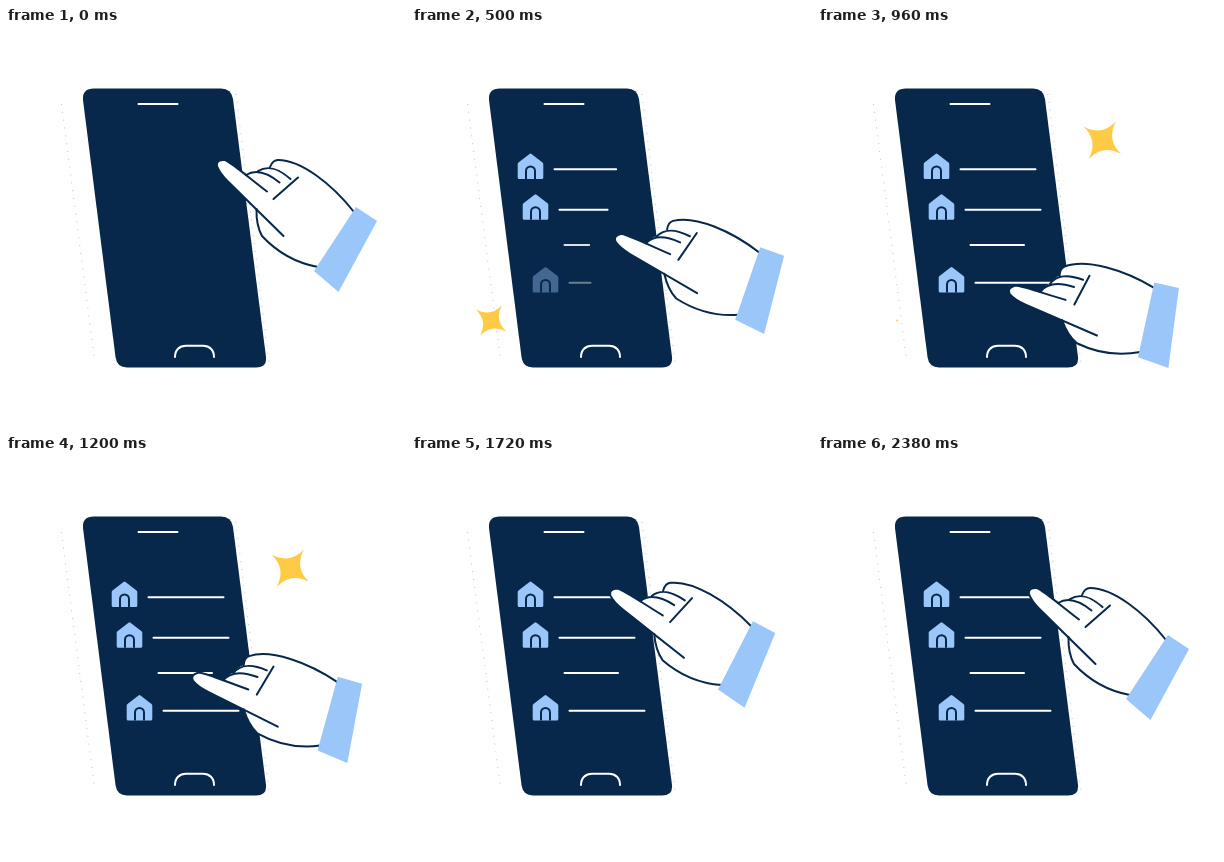
Write an HTML page that moves like this. It is 400 px wide and 400 px high and loops after 2400 ms.

```html
<!DOCTYPE html>
<html lang="en">
<head>
<meta charset="utf-8">
<title>Phone list</title>
<style>
  html, body { margin: 0; width: 100%; height: 100%; overflow: hidden; background: #fff; }
  svg { display: block; width: 100%; height: 100%; }
  .ink { fill: none; stroke: #07284a; stroke-width: 2; stroke-linecap: round; stroke-linejoin: round; }
  .white { fill: none; stroke: #fff; stroke-width: 2; stroke-linecap: round; }
  .edge { fill: none; stroke: #a3c8f6; stroke-width: 1; stroke-dasharray: 1 6.9; }
  .blue { fill: #9ac6f9; }
  .star { fill: #ffcb47; }
</style>
</head>
<body>
<svg viewBox="0 0 400 400">
  <defs>
    <g id="house">
      <path class="blue" d="M-1-12.5Q0-13.3 1-12.5L12-4Q12.8-3.3 12.8-2.3V11Q12.8 12.5 11.3 12.5H-11.3Q-12.8 12.5-12.8 11V-2.3Q-12.8-3.3-12-4Z"/>
      <path class="ink" style="stroke-linecap:butt" d="M-4.5 12.6V4.5A4.5 4.5 0 0 1 4.5 4.5V12.6"/>
    </g>
    <path id="sparkle" class="star" d="M0-1Q.12-.12 1 0Q.12 .12 0 1Q-.12 .12-1 0Q-.12-.12 0-1Z"/>
  </defs>
  <path class="edge" d="M55.5 76L88.5 332M230 66L263 335"/>
  <path fill="#07284a" d="M88 60.5H215Q225.5 60.5 227 71L260 329Q261 339.5 250 339.5H121Q111 339.5 109.5 329L77 72Q76 60.5 88 60.5Z"/>
  <path class="white" d="M132.5 76H171.5M169 329C169 322 173.500 317.800 180 317.800H197C203.500 317.800 208 322 208 329"/>
  <g id="rows"></g>
  <g id="stars"></g>
  <g id="hand">
    <path fill="#fff" d="M240 147Q248 142 253 143Q258 138.5 264 139C266 134 268 132 272 132C295 132 326 156 348 184L312 239.5C290 235 270 223 256 208Q250 197 250.5 181Z"/>
    <path class="ink" style="fill:#fff" d="M277.5 208L222 153.5Q213.5 145 211 138Q210 131.500 219 132C226 135 242 149 261 163.5"/>
    <path class="ink" d="M240 147C248 142 258 142 273.5 154.5M252 143C262 137 272 140 284.5 151M264 139C266 134 268 132 272 132C295 132 326 156 348 184M292 149.5L267.5 171M250.5 181Q250 197 256 208C270 223 290 235 312 239"/>
    <path class="blue" d="M350 179L371 193L332.5 264L308 243Z"/>
  </g>
</svg>
<script>
const LOOP = 2400;
const $ = id => document.getElementById(id);

function add(parent, tag, attrs = {}) {
  const el = document.createElementNS('http://www.w3.org/2000/svg', tag);
  for (const k in attrs) el.setAttribute(k, attrs[k]);
  return parent.appendChild(el);
}

const clamp = v => Math.max(0, Math.min(1, v));
const ease = u => (1 - Math.cos(Math.PI * clamp(u))) / 2;

// Start value, then turning points [from, to, value], eased between
function swing(t, value, ...turns) {
  return turns.reduce((v, [from, to, next]) => v + (next - v) * ease((t - from) / (to - from)), value);
}

const rows = [
  { y: 141.3, len: 75, house: 138.5 },
  { y: 181.8, len: 75, house: 179.2 },
  { y: 217, len: 53.5 },
  { y: 254.7, len: 75, house: 252 }
];
rows.forEach((row, i) => {
  row.x = 142.5 + 5 * i;
  row.start = 110 * i;
  row.el = add($('rows'), 'g');
  if (row.house) add(row.el, 'use', { href: '#house', x: row.x - 24, y: row.house });
  row.line = add(row.el, 'path', { class: 'white' });
});

const stars = [
  { x: 79, y: 292.5, r: 18.7, delay: 0 },
  { x: 284.3, y: 112.2, r: 23.2, delay: 580 }
];
for (const star of stars) star.el = add($('stars'), 'use', { href: '#sparkle' });

function draw(t) {
  for (const { el, line, x, y, len, start } of rows) {
    el.setAttribute('opacity', clamp((t - start - 75) / 240));
    line.setAttribute('d', `M${x} ${y}h${len * clamp((t - start) / 610)}`);
  }

  for (const { el, x, y, r, delay } of stars) {
    const size = swing(t - delay, 0, [0, 320, 1], [700, 1020, 0]);
    el.setAttribute('transform', `translate(${x} ${y}) rotate(${54 * size - 18}) scale(${r * size})`);
  }

  // The hand turns about its wrist
  const x = swing(t, 351, [320, 1300, 332.6], [1300, 2130, 351]);
  const y = swing(t, 180, [0, 960, 255], [960, 1540, 164], [1540, 2300, 180]);
  const angle = swing(t, 0, [0, 830, -21.5], [830, 2220, 0]);
  $('hand').setAttribute('transform', `translate(${x} ${y}) rotate(${angle}) translate(-351 -180)`);
}

const start = performance.now();
function tick() {
  draw((performance.now() - start) % LOOP);
  requestAnimationFrame(tick);
}
draw(0);
requestAnimationFrame(tick);
</script>
</body>
</html>
```
